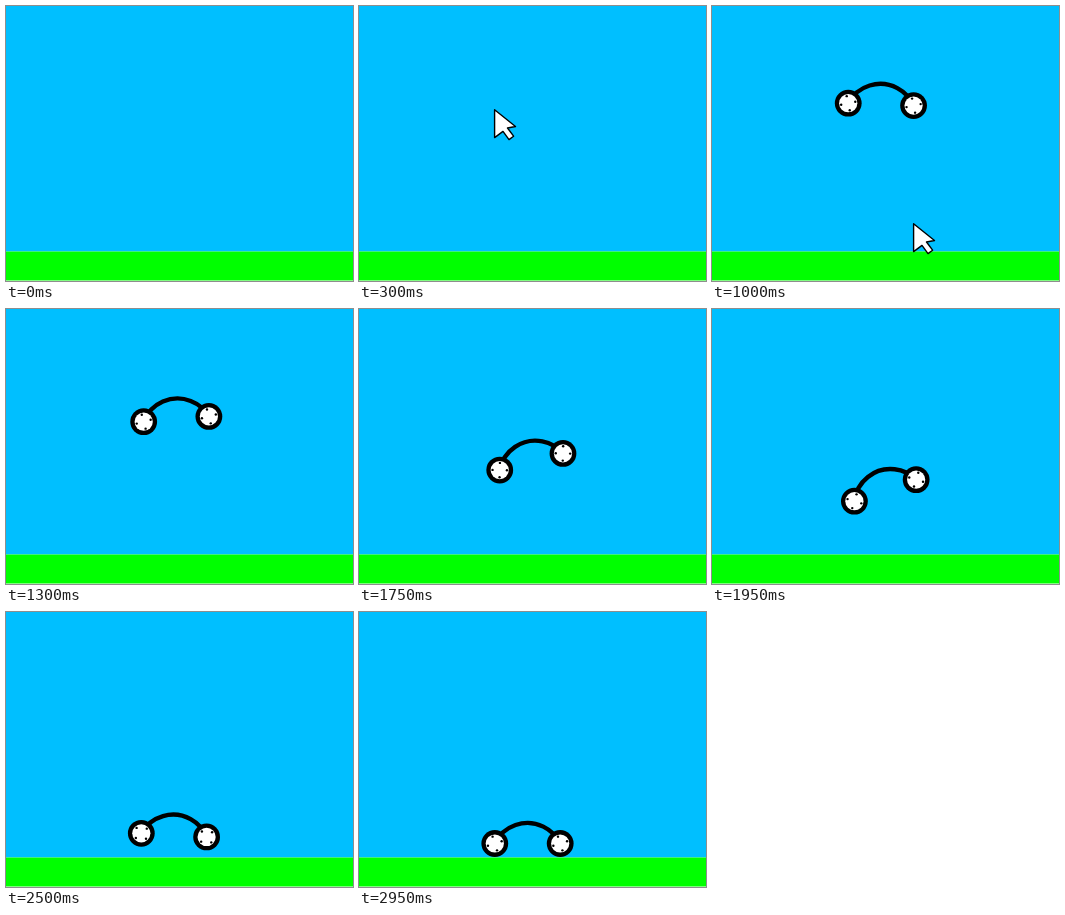
An HTML page with a canvas that plays this animation: 347x275 px, repeating every 3 s.

```html
<!DOCTYPE html>
<html lang="en">
<head>
<meta charset="utf-8">
<title>Falling car</title>
<style>
html, body { margin: 0; width: 100%; height: 100%; overflow: hidden; }
canvas { display: block; }
</style>
</head>
<body>
<canvas id="stage" width="347" height="275"></canvas>
<script>
const ctx = document.getElementById('stage').getContext('2d');
const RAD = Math.PI / 180;
const LOOP = 3000, STEP = 50;
const HALF = 32.7;                  // half the wheelbase
const RADIUS = 36.3, DROP = 15.8;   // body arc and its centre below the axle line
const SPAN = Math.atan2(HALF, DROP);
const REST = 231.5;                 // axle height on the ground
const DRAW = 550, DRAW_TIME = 320, EXIT = 850, RELEASE = 890;
const LEFT_HIT = 2200, RIGHT_HIT = 2370, SETTLE = 2720;
const ARROW = new Path2D('M.6 .8 21.5 17.5 13.5 19 19.6 27.2 15 30.6 9 22.4 .6 28.6Z');

const clamp = v => Math.max(0, Math.min(1, v));

function hop(t, start, height) {
  const k = clamp((t - start) / (SETTLE - start));
  return 4 * height * k * (1 - k);
}

// Free fall with a slow backward tilt
function falling(t) {
  const s = Math.max(0, t - RELEASE) / 1000;
  return {
    x: 168.4 + 4.6 * s,
    y: 97.5 + 74.7 * s * s,
    tilt: (4.6 - 22.5 * s) * RAD,
    spin: -8 - 44 * s + 64 * s * s
  };
}

// Each wheel lands, hops once and settles
function landing(t) {
  const s = (t - LEFT_HIT) / 1000;
  const left = hop(t, LEFT_HIT, 10.4);
  const right = 22.8 * clamp((RIGHT_HIT - t) / (RIGHT_HIT - LEFT_HIT)) + hop(t, RIGHT_HIT, 7);
  return {
    x: 167 + 24 * (s - 0.5) ** 2,
    y: REST - (left + right) / 2,
    tilt: Math.asin((left - right) / (2 * HALF)),
    spin: 45 + 48 * s * s
  };
}

function disc(x, y, r) {
  ctx.beginPath();
  ctx.arc(x, y, r, 0, 2 * Math.PI);
  ctx.fill();
}

function wheel(x, y, spin) {
  ctx.fillStyle = '#000';
  disc(x, y, 13.4);
  ctx.fillStyle = '#fff';
  disc(x, y, 9.1);
  ctx.fillStyle = '#000';
  for (let i = 0; i < 4; i++) {
    const a = (spin + 90 * i) * RAD;
    disc(x + 7.2 * Math.cos(a), y + 7.2 * Math.sin(a), 1.2);
  }
}

// Draws the given part of the arc and returns its end point
function body({ x, y, tilt }, part) {
  const start = -Math.PI / 2 - SPAN + tilt;
  const end = start + 2 * SPAN * part;
  const cx = x - DROP * Math.sin(tilt), cy = y + DROP * Math.cos(tilt);
  ctx.beginPath();
  ctx.arc(cx, cy, RADIUS, start, end + 0.001);
  ctx.lineWidth = 4.4;
  ctx.stroke();
  return [cx + RADIUS * Math.cos(end), cy + RADIUS * Math.sin(end)];
}

function cursor(x, y) {
  ctx.save();
  ctx.translate(x, y);
  ctx.fillStyle = '#fff';
  ctx.fill(ARROW);
  ctx.lineWidth = 1.4;
  ctx.stroke(ARROW);
  ctx.restore();
}

function band(color, top, bottom) {
  ctx.fillStyle = color;
  ctx.fillRect(0, top, 347, bottom - top);
}

function render(t) {
  band('#fff', 0, 275);
  band('#00bfff', 0, 245.5);
  band('#0f0', 245.5, 274.5);

  if (t < DRAW) {
    if (t > 0) cursor(135, 275 - 172 * clamp(t / 300));
    return;
  }
  const car = t < LEFT_HIT ? falling(t) : landing(t);
  const tip = body(car, clamp((t - DRAW) / DRAW_TIME));
  if (t >= RELEASE) {
    const dx = HALF * Math.cos(car.tilt), dy = HALF * Math.sin(car.tilt);
    wheel(car.x - dx, car.y - dy, car.spin);
    wheel(car.x + dx, car.y + dy, car.spin);
  }
  if (t <= EXIT) cursor(tip[0] - 1, tip[1] - 2);
  else if (t < 1100) cursor(201, 97 + 0.8 * (t - EXIT));
}

ctx.strokeStyle = '#000';
ctx.lineCap = ctx.lineJoin = 'round';
const begin = performance.now();

function frame() {
  render(Math.floor((performance.now() - begin) % LOOP / STEP) * STEP);
  requestAnimationFrame(frame);
}
frame();
</script>
</body>
</html>
```
